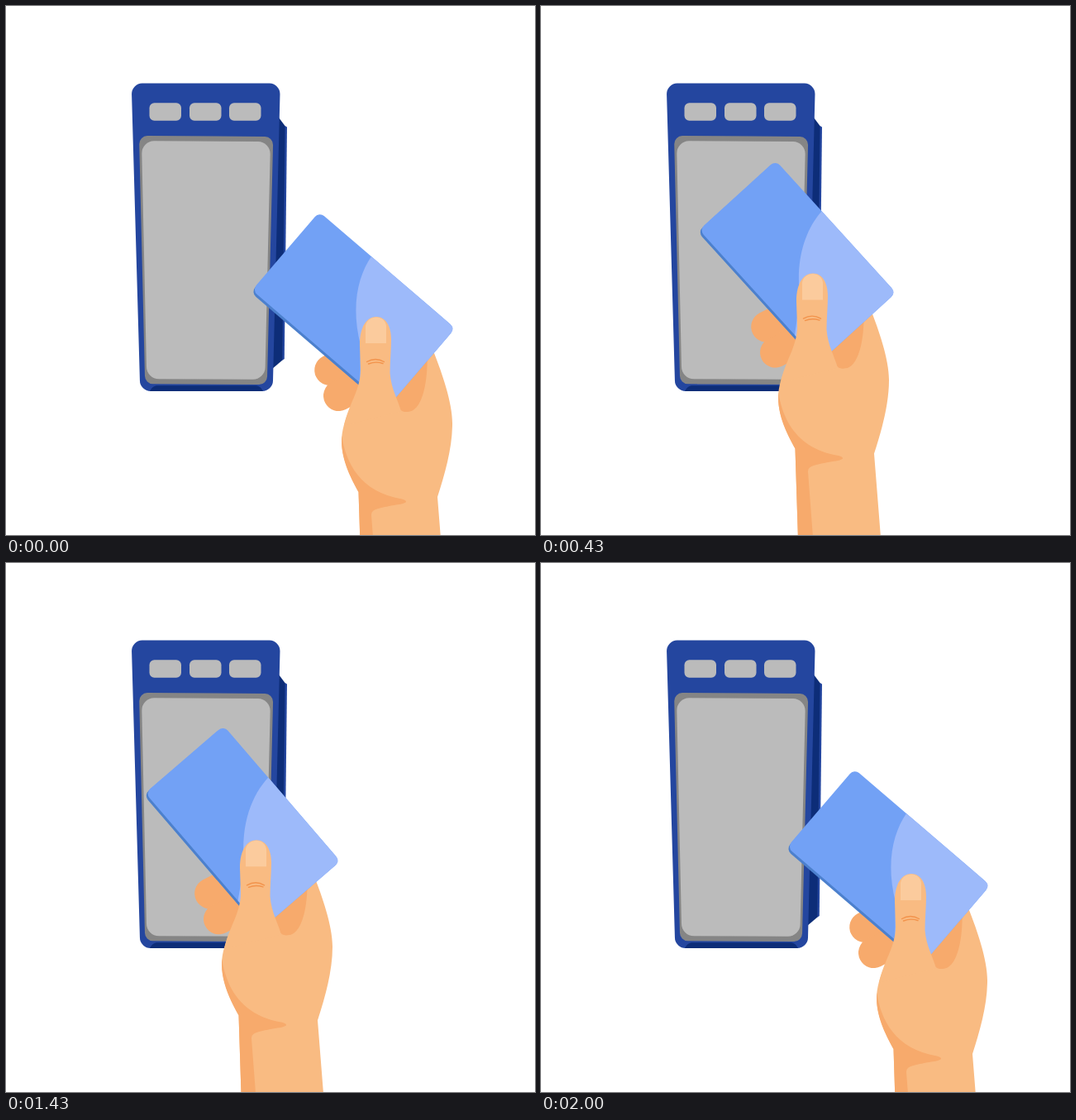
An HTML page that plays this animation: 640 px wide and 640 px high, repeating every 2430 ms.

```html
<!DOCTYPE html>
<html lang="en">
<head>
<meta charset="utf-8">
<title>Card reader</title>
<style>
  html, body { margin: 0; width: 100%; height: 100%; overflow: hidden; background: #fff; }
  svg { display: block; width: 100%; height: 100%; }
  .blue { fill: #24469f; }
  .navy { fill: #0d2d78; }
  .bezel { fill: #858585; }
  .grey { fill: #bbb; }
  .skin { fill: #f9bb82; }
  .shade { fill: #f7aa6c; }
  .finger { stroke: #f7aa6c; stroke-width: 37; stroke-linecap: round; }
  .crease { fill: none; stroke: #f2934c; stroke-width: 1.4; stroke-linecap: round; }
</style>
</head>
<body>
<svg viewBox="0 0 640 640">
  <g id="reader">
    <path class="navy" d="M330 135 L339 147 L335 428 L322 439Z"/>
    <path class="blue" d="M337.6 145 L340 146.500 L336.800 427 L334.400 428.500Z"/>
    <path class="blue" data-points="151.700,93.500 331.800,93.500 322.700,466 162.300,466" data-radius="13"/>
    <path class="navy" d="M174 466 Q177 460 182 459.300 H303 Q308 460 311 466Z"/>
    <path class="bezel" data-points="161,157 323.300,158 315.800,458 168.200,457.300" data-radius="10"/>
    <path class="grey" data-points="164,163.300 320,164 313.300,451.700 170.300,451.300" data-radius="15"/>
    <rect class="grey" x="173.500" y="117.300" width="38.500" height="21.500" rx="6"/>
    <rect class="grey" x="222" y="117.300" width="38.500" height="21.500" rx="6"/>
    <rect class="grey" x="270" y="117.300" width="38.500" height="21.500" rx="6"/>
  </g>

  <g id="hand">
    <path class="finger" d="M391.700 440.500 L440 416"/>
    <path class="finger" d="M402.500 471.500 L440 452"/>
    <path class="skin" d="M429 445 C428 472 406 496 406 527 C406 549 419 574 426.500 588
      L432 760 H536 L530 695 L522 594 C531 566 540 535 540 505 C540 479 527 443 518 420
      L506 396 L470 440Z"/>
    <path class="shade" d="M460 440 L508 402 C513 440 507 491 486 491 Q480 491.500 478 489 L458 475Z"/>
    <path class="shade" d="M406.300 520 C411 552 428 588 479 596.500 Q484.500 598 484 600
      C481 604 457 604 444.500 610.500 Q441.800 612 442 616 L448 695 L453 760 H432
      L426.500 588 C419 574 404 549 406.300 520Z"/>

    <g id="card">
      <g transform="translate(379 249) rotate(40.600)">
        <rect x=".6" y="90" width="186" height="38" rx="8" fill="#4c80cd"/>
        <rect width="216.500" height="125" rx="8" fill="#72a1f5"/>
        <path fill="#9dbafa" d="M83 0 H208.500 Q216.500 0 216.500 8 V117 Q216.500 125 208.500 125
          H172 L143 90 C103 62 86 28 83 0Z"/>
      </g>
    </g>

    <path class="skin" d="M448 376 C437 376 428 387 428 410 L429 440 C429 465 414 482 409 508
      L478 490.500 C475 478 466 464 464.500 444 C464.500 430 466 416 466 403 C466 387 459 376 448 376Z"/>
    <path fill="#fbcb9d" d="M435 408 V387 C436 380 442 376.400 448 376.400 S459 380 460 387 V408Z"/>
    <path class="crease" d="M436.500 430.500 Q447 424.500 457.500 430.500"/>
    <path class="crease" d="M438.500 433 Q447 429.500 456 432.500"/>
  </g>
</svg>
<script>
  const LOOP = 2430, FPS = 14, LAST = 28;
  const hand = document.getElementById('hand');
  const card = document.getElementById('card');

  // Keys: step, value, slope per step
  const reach = [[0, 0, 0], [4, 72, 23], [6, 119, 21], [8, 147, 2], [9, 147, 0],
    [18.5, 147, 0], [20, 145, -5], [24, 56, -22], [28, 0, 0]];
  const press = [[0, 1, 0], [8, 1, 0], [13.2, 0.959, 0], [18.5, 1, 0], [28, 1, 0]];

  function sample(keys, x) {
    const i = Math.max(1, keys.findIndex(k => k[0] >= x));
    const [x0, v0, s0] = keys[i - 1], [x1, v1, s1] = keys[i];
    const w = x1 - x0, t = (x - x0) / w, r = 1 - t;
    return v0 * r * r * (1 + 2 * t) + v1 * t * t * (3 - 2 * t)
      + w * t * r * (s0 * r - s1 * t);
  }

  // Polygon with softened corners
  function roundPath(points, radius) {
    const toward = (a, b) => {
      const k = radius / Math.hypot(b[0] - a[0], b[1] - a[1]);
      return [a[0] + (b[0] - a[0]) * k, a[1] + (b[1] - a[1]) * k];
    };
    const n = points.length;
    return points.map((p, i) => {
      const from = toward(p, points[(i + n - 1) % n]);
      const to = toward(p, points[(i + 1) % n]);
      return `${i ? 'L' : 'M'}${from} A${radius} ${radius} 0 0 1 ${to}`;
    }).join(' ') + 'Z';
  }

  for (const el of document.querySelectorAll('[data-points]')) {
    const points = el.dataset.points.split(' ').map(p => p.split(',').map(Number));
    el.setAttribute('d', roundPath(points, +el.dataset.radius));
  }

  // Steps begin on whole hundredths of a second
  function stepAt(ms) {
    let n = Math.min(LAST, Math.floor(ms * FPS / 1000) + 1);
    while (Math.round(n * 100 / FPS) * 10 > ms) n--;
    return n;
  }

  function draw(ms) {
    const n = stepAt(ms);
    const u = sample(reach, n), s = sample(press, n);
    const lift = u * 0.269 + u * (147 - u) * (0.0077 - 0.0000133 * u);
    hand.setAttribute('transform',
      `translate(325 520) scale(${s}) translate(${-325 - u} ${-520 - lift})`);
    card.setAttribute('transform', `rotate(${0.06 * u} 470 435)`);
  }

  const start = performance.now();
  function tick() {
    draw((performance.now() - start) % LOOP);
    requestAnimationFrame(tick);
  }
  tick();
</script>
</body>
</html>
```
